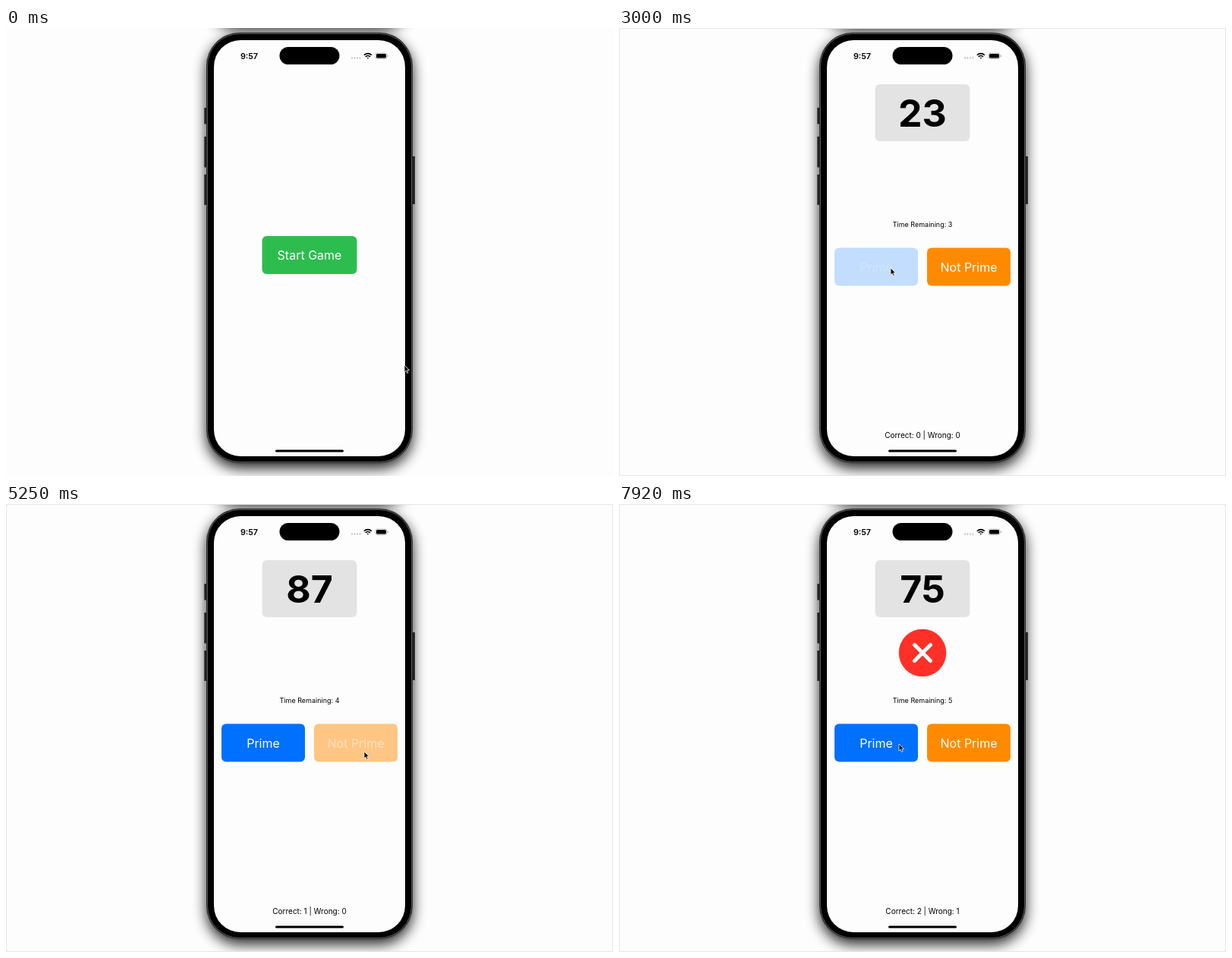
Write an HTML page that moves like this. It is 800 px wide and 590 px high and loops after 8000 ms.

```html
<!DOCTYPE html>
<html lang="en">
<head>
<meta charset="utf-8">
<title>Prime game</title>
<style>
  html, body { margin: 0; height: 100%; overflow: hidden; background: #fdfdfd; }
  svg { display: block; width: 100vw; height: 100vh; }
  text { font-family: Inter, sans-serif; text-anchor: middle; }
  .label { font-size: 16px; fill: #fff; }
</style>
</head>
<body>
<svg viewBox="0 0 800 590">
  <defs>
    <filter id="blur" filterUnits="userSpaceOnUse" x="200" y="-40" width="400" height="700">
      <feGaussianBlur stdDeviation="9"/>
    </filter>
    <rect id="shadow" x="264" y="13" width="272" height="567" rx="44" opacity=".85" filter="url(#blur)"/>
  </defs>

  <rect width="800" height="590" fill="#fdfdfd"/>
  <use href="#shadow" y="-578"/>
  <use href="#shadow"/>

  <!-- phone -->
  <path d="M262.8 105v21.500M262.8 143v40.500M262.8 193v40M537.400 169v63" stroke="#222" stroke-width="3"/>
  <rect x="264" y="6" width="272" height="567" rx="44" fill="#2b2b2b"/>
  <rect x="265.500" y="7.500" width="269" height="564" rx="42.500" fill="#000" stroke="#555"/>
  <rect x="274" y="16" width="252" height="548" rx="35" fill="#fdfdfd"/>
  <rect x="360.500" y="25" width="79" height="23" rx="11.500"/>
  <rect x="355" y="555.500" width="90" height="3" rx="1.500"/>

  <!-- status bar -->
  <text x="320.500" y="40.700" font-size="10.800" font-weight="600">9:57</text>
  <path d="M456 39.500h12" stroke="#aaa" stroke-width="1.800" stroke-linecap="round" stroke-dasharray="0 3.500"/>
  <g fill="none" stroke="#000" stroke-width="1.600">
    <path d="M471.900 35.700a7 7 0 0 1 10 0M473.800 37.900a4.400 4.400 0 0 1 6.200 0"/>
    <path d="M476.900 40.600l-1.200-1.200a1.700 1.700 0 0 1 2.400 0z" fill="#000" stroke="none"/>
  </g>
  <rect x="487" y="33" width="15" height="7.500" rx="2.400" fill="none" stroke="#aaa" stroke-width=".8"/>
  <rect x="488" y="34" width="13" height="5.500" rx="1.600"/>
  <path d="M503.300 35.500v2.500" stroke="#aaa"/>

  <g id="intro">
    <g id="start">
      <rect x="337.500" y="274" width="125" height="50" rx="6" fill="#2dbd4e"/>
      <text class="label" x="400" y="305">Start Game</text>
    </g>
  </g>

  <g id="game">
    <rect x="337.500" y="74" width="125" height="75" rx="6" fill="#e3e3e3"/>
    <text id="number" x="400" y="130" font-size="50" font-weight="700"></text>
    <g id="mark" fill="none" stroke="#fff" stroke-width="5" stroke-linecap="round" stroke-linejoin="round">
      <circle id="disc" cx="400" cy="196" r="31.300" stroke="none"/>
      <path id="sign"/>
    </g>
    <text id="timer" x="400" y="262" font-size="9"></text>
    <g id="prime">
      <rect x="284" y="289.500" width="110" height="50" rx="6" fill="#0070ff"/>
      <text class="label" x="339" y="320.500">Prime</text>
    </g>
    <g id="notPrime">
      <rect x="406" y="289.500" width="110" height="50" rx="6" fill="#ff8a00"/>
      <text class="label" x="461" y="320.500">Not Prime</text>
    </g>
    <text id="score" x="400" y="540" font-size="10"></text>
  </g>

  <path id="cursor" d="M0 0V9.200L2.100 7.300L3.500 10.500L5.100 9.800L3.700 6.700H6.600Z" stroke="#fff" stroke-width=".8"/>
  <rect id="edge" x=".5" y=".5" width="799" height="589" fill="none" stroke="#e6e6e6"/>
</svg>

<script>
const LOOP = 8000;
const START = 910;       // the game screen replaces the start button
const EDGE_AT = 2490;
const FEEDBACK = 1000;   // how long a check or cross stays

// Each round runs from `from`; the answer counts when the button is released.
const rounds = [
  { number: 23, from: START, answered: 3080, right: true },
  { number: 87, from: 4080, answered: 5400, right: true },
  { number: 75, from: 6400, answered: 7160, right: false },
];
const presses = [
  { id: "start", down: 800, up: START },
  { id: "prime", down: 2800, up: 3080 },
  { id: "notPrime", down: 5150, up: 5400 },
  { id: "prime", down: 6880, up: 7160 },
];
const moves = [
  { from: 0, to: 670, x: 424, y: 312 },
  { from: 1350, to: 2250, x: 358, y: 316 },
  { from: 3350, to: 4050, x: 472, y: 326 },
  { from: 5900, to: 6580, x: 369, y: 316 },
];

const $ = id => document.getElementById(id);
const clamp = v => Math.max(0, Math.min(1, v));
const ease = v => v * v * (3 - 2 * v);
const show = (id, on) => $(id).setAttribute("display", on ? "inline" : "none");

function setText(id, text) {
  if ($(id).textContent !== text) $(id).textContent = text;
}

function placeCursor(t) {
  let x = 525, y = 444;
  for (const m of moves) {
    const k = ease(clamp((t - m.from) / (m.to - m.from)));
    x += (m.x - x) * k;
    y += (m.y - y) * k;
  }
  $("cursor").setAttribute("transform", `translate(${x} ${y})`);
}

function fadeButtons(t) {
  const pressed = { start: 0, prime: 0, notPrime: 0 };
  for (const { id, down, up } of presses) {
    pressed[id] += clamp((t - down) / 150) * (1 - clamp((t - up) / 250));
  }
  for (const id in pressed) {
    for (const part of $(id).children) part.setAttribute("opacity", 1 - 0.77 * pressed[id]);
  }
}

function drawRound(t) {
  const round = rounds.filter(r => t >= r.from).pop() || rounds[0];
  const done = rounds.filter(r => t >= r.answered);
  const correct = done.filter(r => r.right).length;
  const elapsed = Math.max(0, Math.min(t, round.answered) - round.from);

  setText("number", String(round.number));
  setText("timer", `Time Remaining: ${5 - Math.floor(elapsed / 1000)}`);
  setText("score", `Correct: ${correct} | Wrong: ${done.length - correct}`);
  show("mark", t >= round.answered && t < round.answered + FEEDBACK);
  $("disc").setAttribute("fill", round.right ? "#2dbd4e" : "#ff3028");
  $("sign").setAttribute("d", round.right
    ? "M387.5 197.500L396.500 208.500L412 184.500"
    : "M389.500 185.500L410.500 206.500M410.500 185.500L389.500 206.500");
}

function draw() {
  const t = performance.now() % LOOP;
  show("intro", t < START);
  show("game", t >= START);
  show("edge", t >= EDGE_AT);
  drawRound(t);
  fadeButtons(t);
  placeCursor(t);
  requestAnimationFrame(draw);
}
draw();
</script>
</body>
</html>
```
